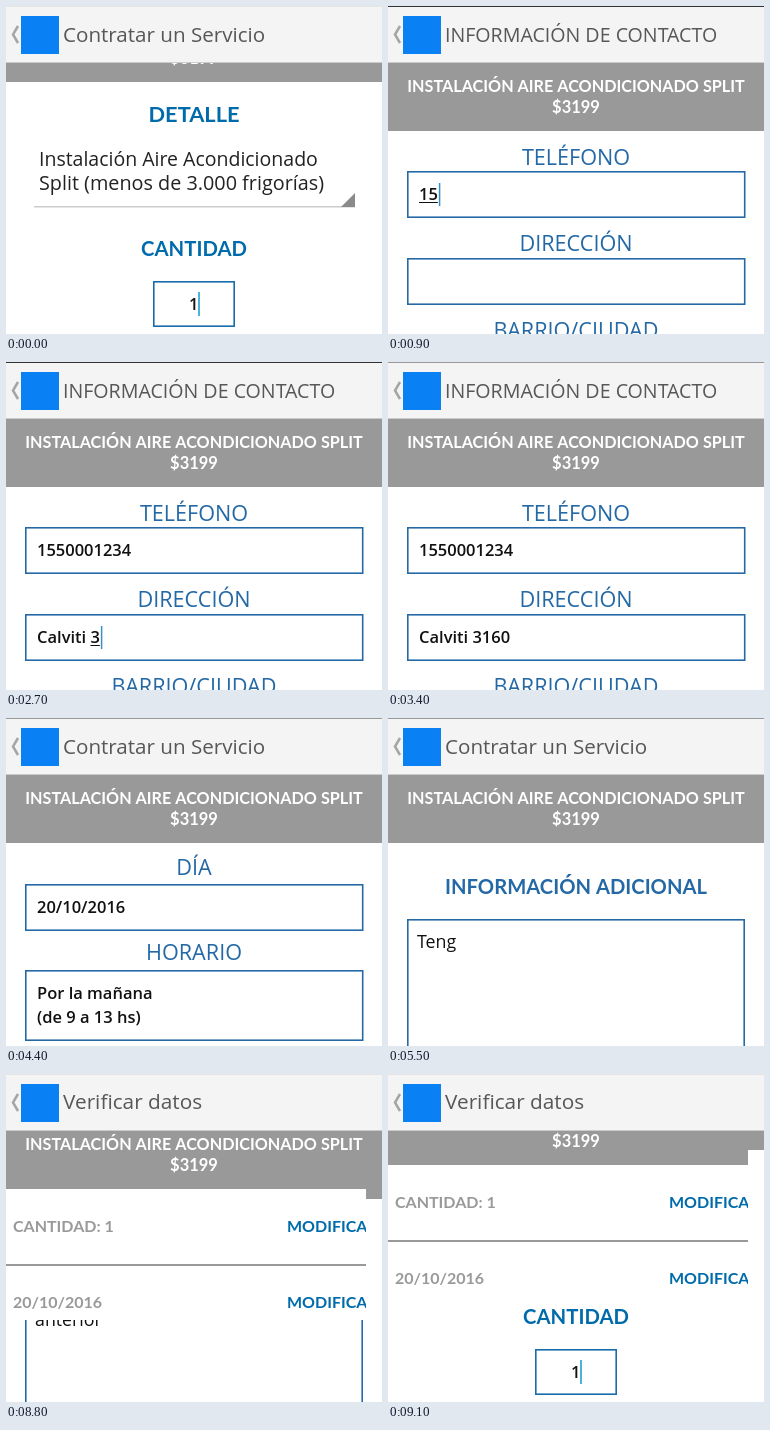
Animation of 376x328 px, one loop 9.2 s. Source, as an HTML page with a canvas:

```html
<!DOCTYPE html>
<html lang="es">
<head>
<meta charset="utf-8">
<title>Contratar un servicio</title>
<style>
html, body { margin: 0; width: 100%; height: 100%; overflow: hidden; background: #fff; }
canvas { display: block; }
</style>
</head>
<body>
<canvas id="stage" width="376" height="328"></canvas>
<script>
const ctx = document.getElementById('stage').getContext('2d');
const W = 376, H = 328, LOOP = 9200, STEP = 100;
const SANS = '"Open Sans", "Noto Sans", sans-serif';
const CAPS = 'Lato, "Open Sans", sans-serif';
const BLUE = '#006bab', FIELD = '#2469a6', GRAY = '#999', INK = '#111';

const PHONE = '1550001234';
const ADDRESS = 'Calviti 3160';
const NOTE = ['Tengo que desinstalar el equipo', 'anterior'];

function rect(x, y, w, h, color) {
  ctx.fillStyle = color;
  ctx.fillRect(x, y, w, h);
}

function frame(x, y, w, h, color = FIELD) {
  const line = 1.6;
  ctx.strokeStyle = color;
  ctx.lineWidth = line;
  ctx.strokeRect(x + line / 2, y + line / 2, w - line, h - line);
}

function text(str, x, y, size, color, { weight = 500, family = SANS, align = 'left' } = {}) {
  ctx.font = `${weight} ${size}px ${family}`;
  ctx.textAlign = align;
  ctx.fillStyle = color;
  ctx.fillText(str, x, y);
  return ctx.measureText(str).width;
}

const label = (str, x, y, color) => text(str, x, y, 16, color, { weight: 700, family: CAPS });
const title = (str, y, size, color) =>
  text(str, 188, y, size, color, { weight: 700, family: CAPS, align: 'center' });
const heading = (str, y) => text(str, 188, y, 21.6, FIELD, { align: 'center' });
const entry = (str, x, y) => text(str, x, y, 16.5, INK, { weight: 600 });

// Number of keys pressed since start, the first one at start itself
const keys = (t, start) => Math.max(0, Math.floor((t - start) / STEP) + 1);

// A space arrives together with the letter after it
function typeWords(str, count) {
  let end = 0;
  while (end < str.length && count > 0) {
    if (str[end] !== ' ') count--;
    end++;
  }
  return str.slice(0, end);
}

function header(str, size, edge, baseline = 36) {
  rect(0, 0, W, 57, '#f4f4f4');
  rect(0, 0, W, 1, edge);
  rect(0, 56, W, 1, '#cbcbcb');
  ctx.strokeStyle = '#a5a5a5';
  ctx.lineWidth = 2.5;
  ctx.beginPath();
  ctx.moveTo(12, 20);
  ctx.lineTo(7, 28.5);
  ctx.lineTo(12, 37);
  ctx.stroke();
  rect(15, 10, 38, 38, '#0a80f5');
  text(str, 57, baseline, size, '#575757');
}

const orderHeader = edge => header('Contratar un Servicio', 20.6, edge);

function banner(scroll, width = W) {
  rect(0, 56, width, 69 - scroll, GRAY);
  title('INSTALACIÓN AIRE ACONDICIONADO SPLIT', 86 - scroll, 16.2, '#fff');
  title('$3199', 107 - scroll, 16.5, '#fff');
}

function input(y, str, focused) {
  frame(19, y, 338.5, 47);
  const w = entry(str, 31, y + 29);
  if (!focused) return;
  const word = str.slice(0, str.lastIndexOf(' ') + 1);
  const from = ctx.measureText(word).width;
  if (w > from) rect(31 + from, y + 31, w - from, 1, INK);
  rect(32 + w, y + 12, 1.5, 23, '#3a8fc4');
}

function detail() {
  banner(49);
  title('DETALLE', 116, 21.8, BLUE);
  text('Instalación Aire Acondicionado', 33, 160, 19.5, '#222');
  text('Split (menos de 3.000 frigorías)', 33, 184, 19.8, '#222');
  rect(28, 200, 321, 1.5, '#ccc');
  ctx.fillStyle = '#8a8a8a';
  ctx.beginPath();
  ctx.moveTo(349, 187);
  ctx.lineTo(349, 201);
  ctx.lineTo(335, 201);
  ctx.fill();
  title('CANTIDAD', 250, 20.3, BLUE);
  frame(147, 275, 82, 46, '#176ca9');
  entry('1', 183, 304);
  rect(192, 286, 2, 24, '#48b4dc');
  orderHeader('#e4e4e4');
}

function contact(t) {
  const onAddress = t >= 1800;
  banner(0);
  heading('TELÉFONO', 159);
  input(165, PHONE.slice(0, keys(t, 800)), !onAddress);
  heading('DIRECCIÓN', 245);
  input(252, ADDRESS.slice(0, keys(t, 1900)), onAddress && t < 3300);
  heading('BARRIO/CIUDAD', 332);
  header('INFORMACIÓN DE CONTACTO', 19.6, t < 3400 ? '#333' : '#999');
}

function schedule(t) {
  banner(0);
  heading('DÍA', 157);
  input(166, '20/10/2016', false);
  if (t >= 4400) {
    heading('HORARIO', 242);
    frame(19, 252, 338.5, 71);
    entry('Por la mañana', 31, 281);
    entry('(de 9 a 13 hs)', 31, 305);
  }
  orderHeader('#999');
}

function note(t) {
  banner(0);
  title('INFORMACIÓN ADICIONAL', 176, 20.2, FIELD);
  frame(19, 201, 338, 160);
  text(typeWords(NOTE[0], keys(t, 5200)), 29, 230, 17.8, INK);
  text(typeWords(NOTE[1], keys(t, 7900)), 29, 252, 17.8, INK);
  orderHeader('#999');
}

function review(t) {
  const scroll = 2 + 8 * Math.floor((t - 8700) / STEP);
  ctx.save();
  ctx.beginPath();
  ctx.rect(0, 56, 360, 200 - scroll);
  ctx.clip();
  rect(0, 56, 360, 200, '#fff');
  banner(scroll, 360);
  label('CANTIDAD: 1', 7, 168 - scroll, GRAY);
  label('MODIFICAR', 281, 168 - scroll, BLUE);
  rect(0, 200 - scroll, 360, 2, GRAY);
  label('20/10/2016', 7, 244 - scroll, GRAY);
  label('MODIFICAR', 281, 244 - scroll, BLUE);
  ctx.restore();
  header('Verificar datos', 20.8, '#e4e4e4', 35);
}

function draw(t) {
  rect(0, 0, W, H, '#fff');
  if (t < 800 || t >= 9100) detail();
  else if (t < 3900) contact(t);
  else if (t < 4900) schedule(t);
  else note(t);
  if (t >= 8700) review(t);
}

const start = performance.now();
function tick() {
  draw((performance.now() - start) % LOOP);
  requestAnimationFrame(tick);
}
tick();
</script>
</body>
</html>
```
